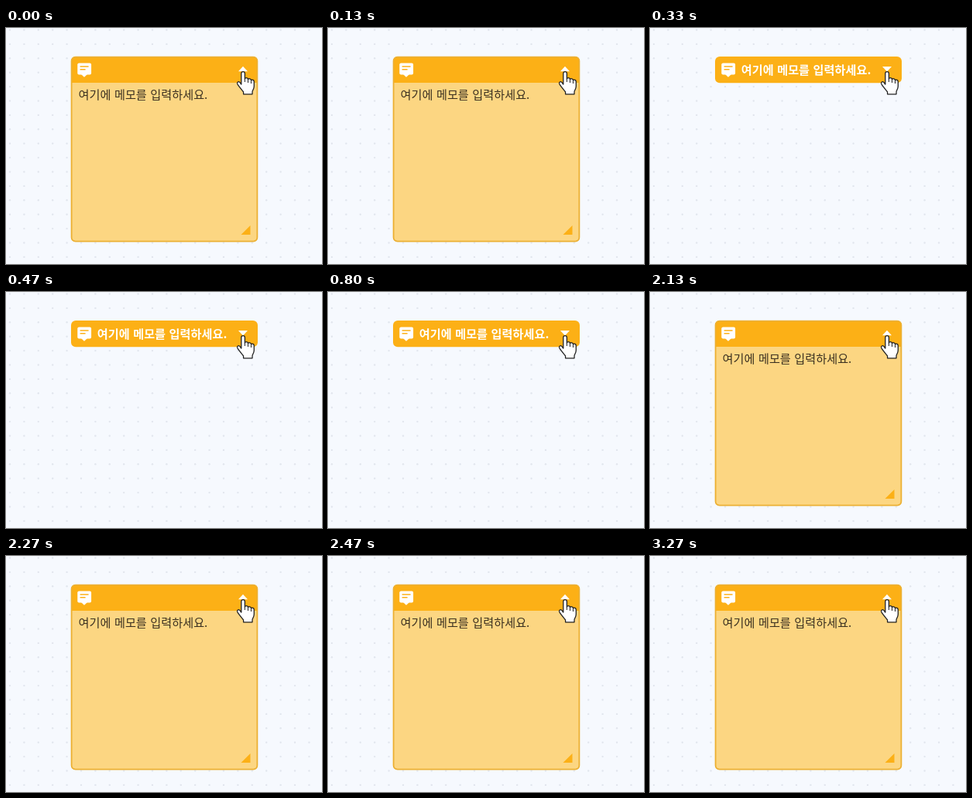
Recreate the animation shown at these times as an HTML page with a canvas. Size 408 px wide and 306 px high, loop 3.34 s.

```html
<!DOCTYPE html>
<html lang="ko">
<head>
<meta charset="utf-8">
<title>Memo</title>
<style>
html, body { margin: 0; width: 100%; height: 100%; overflow: hidden; background: #f6f9fe; }
canvas { display: block; width: 408px; height: 306px; }
</style>
</head>
<body>
<canvas id="stage"></canvas>
<script>
const W = 408, H = 306, LOOP = 3340;
const CLOSE_AT = 330, OPEN_AT = 2130;
const AMBER = '#fcb016', PAPER = '#fcd682', EDGE = '#ecb033';
const MEMO = '여기에 메모를 입력하세요.';
const FONT = '15.2px "Noto Sans CJK KR", "Noto Sans CJK", sans-serif';

const canvas = document.getElementById('stage');
const ctx = canvas.getContext('2d');
const scale = window.devicePixelRatio || 1;
canvas.width = W * scale;
canvas.height = H * scale;

const hand = new Path2D(
  'M303.8 73 V59 C303.8 55.8 308.4 55.8 308.4 59 V66 ' +
  'C309.2 64 312.3 64.4 312.5 66.6 C313.6 65 316.2 65.6 316.5 67.7 ' +
  'C318 66.4 320.3 67.4 320.3 69.6 V75.6 C320.3 79.2 318 80.8 318 83 V85.8 H306.6 V83 ' +
  'C304.6 80.2 301.6 77 298.9 72.8 C297.6 70.2 300.2 68.6 302 70.6 Z');

function fillBox(x, y, w, h, radius, color) {
  ctx.fillStyle = color;
  ctx.beginPath();
  ctx.roundRect(x, y, w, h, radius);
  ctx.fill();
}

function fillPoly(color, ...points) {
  ctx.fillStyle = color;
  ctx.beginPath();
  points.forEach(([x, y]) => ctx.lineTo(x, y));
  ctx.fill();
}

function label(x, y, weight, color) {
  ctx.font = weight + ' ' + FONT;
  ctx.wordSpacing = '1px';
  ctx.fillStyle = color;
  ctx.fillText(MEMO, x, y);
}

function drawGrid() {
  ctx.fillStyle = '#f6f9fe';
  ctx.fillRect(0, 0, W, H);
  ctx.fillStyle = '#e2e6ee';
  for (let y = 2.5; y < H; y += 18.4) {
    for (let x = 5; x < W; x += 18.4) {
      ctx.beginPath();
      ctx.arc(x, y, 1.2, 0, Math.PI * 2);
      ctx.fill();
    }
  }
}

function drawIcon() {
  fillBox(92.3, 45.6, 17.8, 14.8, 2, '#fff');
  fillPoly('#fff', [97, 60], [105, 60], [101, 63.8]);
  fillBox(95.6, 49.2, 11, 1.5, 0, AMBER);
  fillBox(95.6, 53, 7, 1.5, 0, AMBER);
}

function drawHand() {
  ctx.fillStyle = '#fff';
  ctx.fill(hand);
  ctx.strokeStyle = '#222';
  ctx.lineWidth = 1.3;
  ctx.lineJoin = 'round';
  ctx.stroke(hand);
  ctx.lineWidth = 1;
  ctx.beginPath();
  for (const [x, y] of [[308.4, 66], [312.5, 67], [316.5, 68]]) {
    ctx.moveTo(x, y);
    ctx.lineTo(x, y + 4);
  }
  ctx.stroke();
}

function drawBorder() {
  ctx.strokeStyle = EDGE;
  ctx.lineWidth = 1.8;
  ctx.beginPath();
  ctx.roundRect(84.6, 37.6, 239.8, 239, 5);
  ctx.stroke();
}

function draw(open) {
  ctx.setTransform(scale, 0, 0, scale, 0, 0);
  drawGrid();
  if (open) {
    fillBox(84, 37, 241, 240, 6, PAPER);
    fillBox(84, 37, 241, 34, [6, 6, 0, 0], AMBER);
    drawBorder();
    label(93.6, 91.9, 400, '#3a3020');
    fillPoly(AMBER, [315.5, 256], [315.5, 268], [303.5, 268]);
    fillPoly('#fff', [300, 56.2], [306, 49.7], [312, 56.2]);
  } else {
    fillBox(84, 37, 241, 34.3, 6, AMBER);
    label(117.8, 59.6, 700, '#fff');
    fillPoly('#fff', [300, 50], [312, 50], [306, 56.5]);
  }
  drawIcon();
  drawHand();
}

function tick() {
  const t = performance.now() % LOOP;
  draw(t < CLOSE_AT || t >= OPEN_AT);
  requestAnimationFrame(tick);
}
tick();
</script>
</body>
</html>
```
